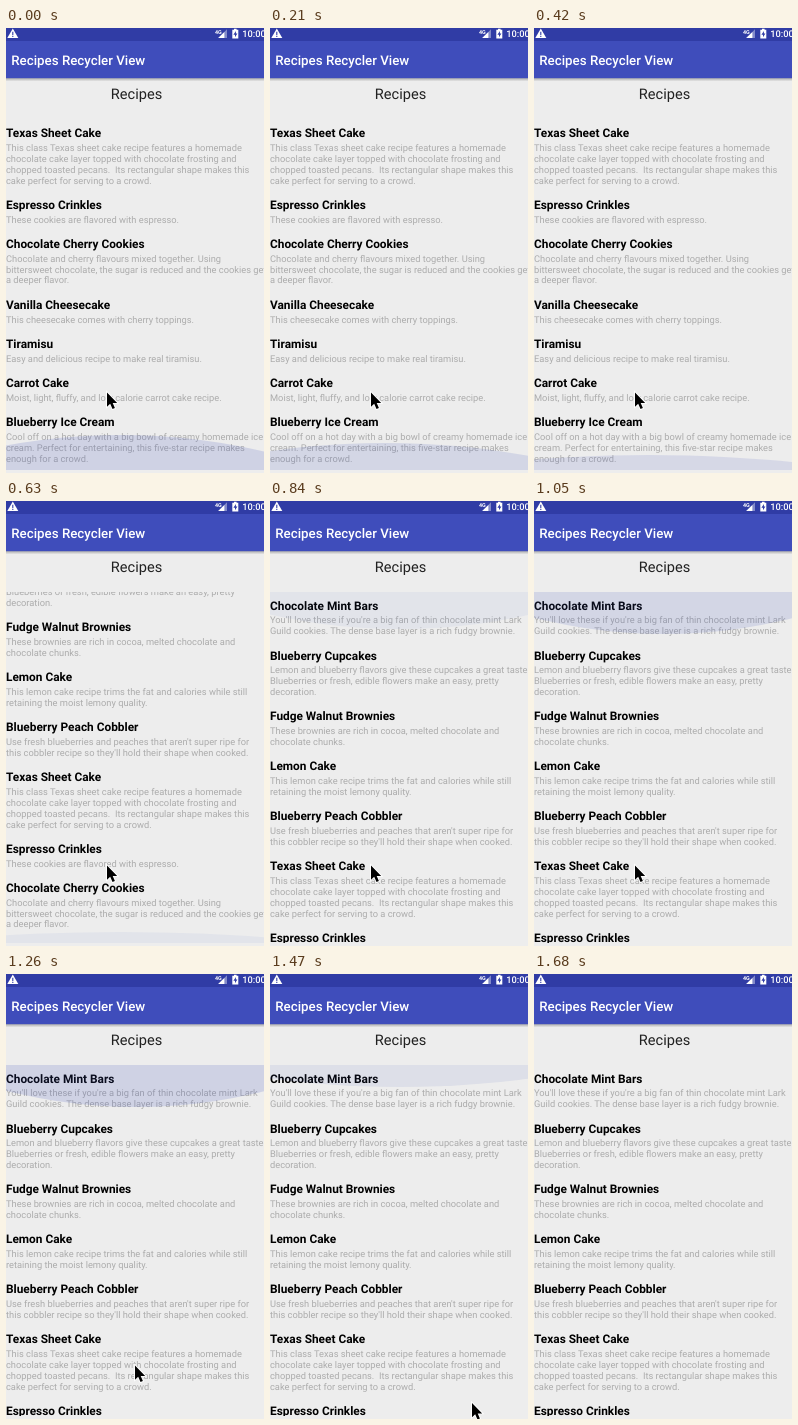
Animation of 258x445 px, one loop 1.88 s. Source, as an HTML page:

```html
<!DOCTYPE html>
<html lang="en">
<head>
<meta charset="utf-8">
<title>Recipes</title>
<style>
  html, body { margin: 0; width: 100%; height: 100%; overflow: hidden; background: #ededed; }
  svg { display: block; width: 100vw; height: 100vh; }
  text { font-family: Roboto, "Liberation Sans", sans-serif; white-space: pre; text-rendering: geometricPrecision; }
  .bar { font-size: 13.3px; font-weight: 500; fill: #fff; }
  .head { font-size: 14.6px; fill: #212121; text-anchor: middle; }
  .name { font-size: 11.87px; font-weight: 700; fill: #000; }
  .note { font-size: 9.3px; fill: #acacac; }
</style>
</head>
<body>
<svg viewBox="0 0 258 445" preserveAspectRatio="none">
  <defs>
    <clipPath id="view"><rect y="91" width="258" height="351"/></clipPath>
    <linearGradient id="shade" x2="0" y2="1">
      <stop stop-color="#000" stop-opacity=".28"/>
      <stop offset="1" stop-color="#000" stop-opacity="0"/>
    </linearGradient>
  </defs>
  <rect width="258" height="445" fill="#ededed"/>
  <g clip-path="url(#view)">
    <g id="list"></g>
    <ellipse id="glow" fill="#3f51b5"/>
  </g>
  <text class="head" x="130.5" y="70.9">Recipes</text>

  <rect y="50" width="258" height="3.5" fill="url(#shade)"/>
  <rect width="258" height="50.2" fill="#3f4dbb"/>
  <rect width="258" height="13" fill="#303ca5"/>
  <text class="bar" x="5.3" y="37.1">Recipes Recycler View</text>

  <g fill="#fff">
    <path d="M6.8 .5L12.3 10H1.3Z"/>
    <path d="M6.8 3.7v3.2M6.8 7.7v1.2" stroke="#303ca5" stroke-width="1.1"/>
    <text x="209" y="5.9" font-size="5.4" font-weight="700">4G</text>
    <path d="M221 1.3V10.1H212.2Z" opacity=".4"/>
    <path d="M218.4 3.9V10.1H212.2Z"/>
    <path d="M228 .7h2.6v1.1h1.7v8.6h-6V1.8H228Z"/>
    <path d="M229.9 3L227.4 6.7h1.6v2.6l2.4-3.8h-1.5Z" fill="#303ca5"/>
    <text x="236.3" y="9" font-size="9.3" font-weight="500">10:00</text>
  </g>
  <path id="cursor" d="M0 0V14.2L3.2 11.3L5.5 16.6L7.9 15.6L5.7 10.4H10.2Z" stroke="#fff" stroke-width="1.8" paint-order="stroke"/>
</svg>
<script>
const recipes = [
  ["Chocolate Mint Bars",
    "You'll love these if you're a big fan of thin chocolate mint Lark",
    "Guild cookies. The dense base layer is a rich fudgy brownie."],
  ["Blueberry Cupcakes",
    "Lemon and blueberry flavors give these cupcakes a great taste.",
    "Blueberries or fresh, edible flowers make an easy, pretty",
    "decoration."],
  ["Fudge Walnut Brownies",
    "These brownies are rich in cocoa, melted chocolate and",
    "chocolate chunks."],
  ["Lemon Cake",
    "This lemon cake recipe trims the fat and calories while still",
    "retaining the moist lemony quality."],
  ["Blueberry Peach Cobbler",
    "Use fresh blueberries and peaches that aren't super ripe for",
    "this cobbler recipe so they'll hold their shape when cooked."],
  ["Texas Sheet Cake",
    "This class Texas sheet cake recipe features a homemade",
    "chocolate cake layer topped with chocolate frosting and",
    "chopped toasted pecans.  Its rectangular shape makes this",
    "cake perfect for serving to a crowd."],
  ["Espresso Crinkles", "These cookies are flavored with espresso."],
  ["Chocolate Cherry Cookies",
    "Chocolate and cherry flavours mixed together. Using",
    "bittersweet chocolate, the sugar is reduced and the cookies get",
    "a deeper flavor."],
  ["Vanilla Cheesecake", "This cheesecake comes with cherry toppings."],
  ["Tiramisu", "Easy and delicious recipe to make real tiramisu."],
  ["Carrot Cake", "Moist, light, fluffy, and low calorie carrot cake recipe."],
  ["Blueberry Ice Cream",
    "Cool off on a hot day with a big bowl of creamy homemade ice",
    "cream. Perfect for entertaining, this five-star recipe makes",
    "enough for a crowd."]
];

const LOOP = 1880, STEP = 210;
const TOP = 91, BOTTOM = 442, RADIUS = 408, RISE = 54.7;
const LINE = 10.88, GAP = 28.2;
const $ = id => document.getElementById(id);
const list = $("list"), glow = $("glow"), cursor = $("cursor");

function addText(cls, y, str) {
  const el = document.createElementNS("http://www.w3.org/2000/svg", "text");
  el.setAttribute("class", cls);
  el.setAttribute("x", 0);
  el.setAttribute("y", y);
  el.textContent = str;
  list.append(el);
}

let y = 0;
for (const [name, ...lines] of recipes) {
  addText("name", y, name);
  lines.forEach((line, i) => addText("note", y + 13.5 + i * LINE, line));
  y += GAP + lines.length * LINE;
}

// Linear track through [step, value] points.
function track(points, s) {
  let [s0, v0] = points[0];
  for (const [s1, v1] of points) {
    if (s <= s1) return s1 === s0 ? v1 : v0 + (v1 - v0) * (s - s0) / (s1 - s0);
    s0 = s1;
    v0 = v1;
  }
  return v0;
}

const scroll = [[0, -151.3], [2, -151.3], [3, 19.7], [4, 108.7]];
const lowDepth = [[0, 35], [1, 27], [2, 15], [3, 11]];
const lowAlpha = [[0, .17], [2, .13], [3, .06]];
const highDepth = [[4, 37], [5, 42], [6, 42], [7, 22], [8, 5]];
const highAlpha = [[4, .06], [5, .15], [6, .17], [7, .09], [8, 0]];
const cursorX = [[5, 101], [6, 129], [7, 202]];
const cursorY = [[5, 364.5], [6, 391.5], [7, 429]];

function draw(ms) {
  const s = Math.floor(ms % LOOP / STEP);
  list.setAttribute("transform", `translate(0 ${track(scroll, s)})`);

  const low = s < 4;
  const depth = track(low ? lowDepth : highDepth, s);
  const ry = RADIUS * depth / RISE;
  glow.setAttribute("cx", low ? 115 : 130);
  glow.setAttribute("cy", low ? BOTTOM - depth + ry : TOP + depth - ry);
  glow.setAttribute("rx", RADIUS);
  glow.setAttribute("ry", ry);
  glow.setAttribute("opacity", track(low ? lowAlpha : highAlpha, s));

  cursor.setAttribute("transform", `translate(${track(cursorX, s)} ${track(cursorY, s)})`);
  cursor.setAttribute("visibility", s < 8 ? "visible" : "hidden");
}

let start;
function tick(now) {
  start ??= now;
  draw(now - start);
  requestAnimationFrame(tick);
}
draw(0);
requestAnimationFrame(tick);
</script>
</body>
</html>
```
